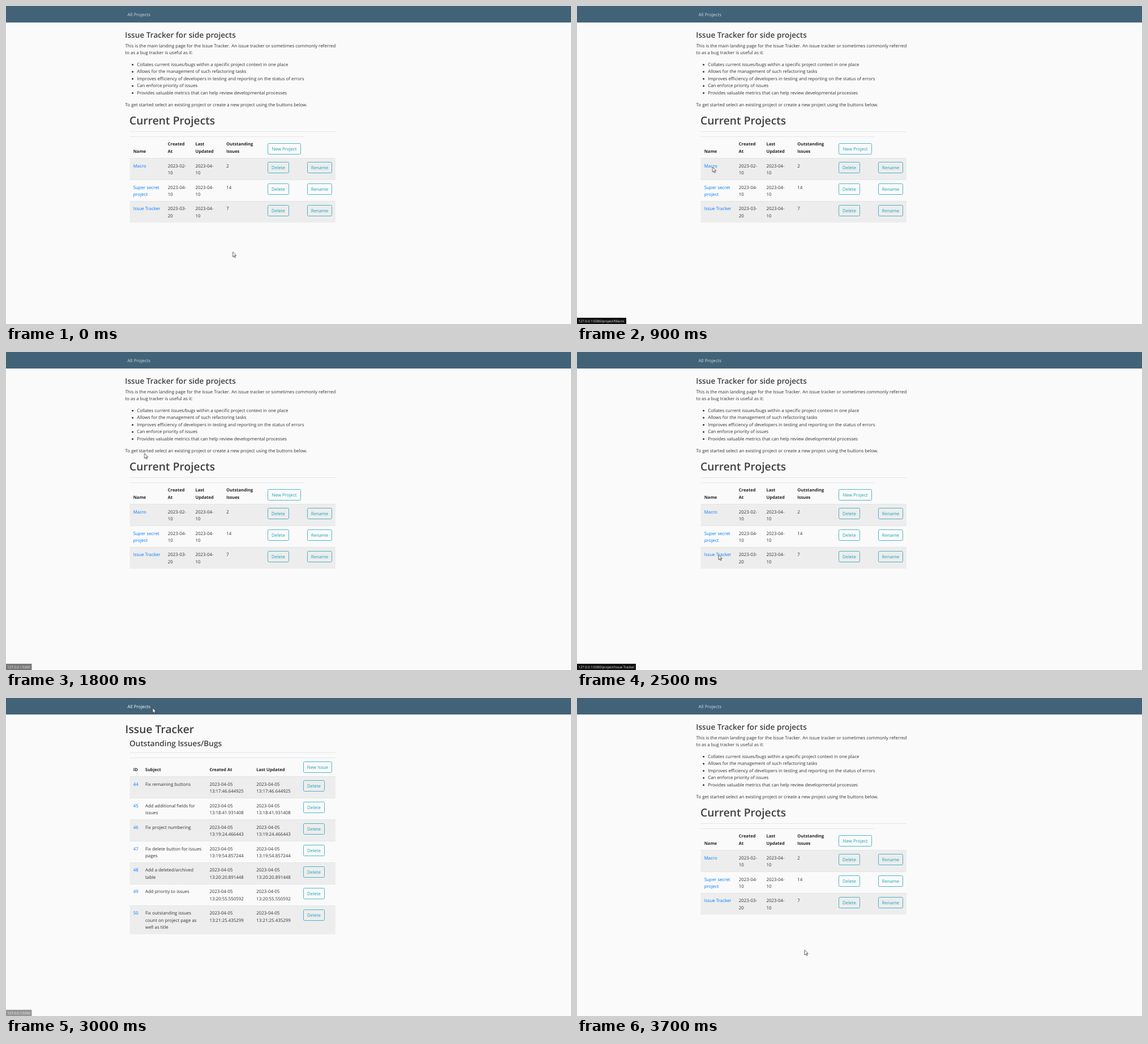
An HTML page for the animation above (4000 ms loop, 998 by 561 pixels).

```html
<!DOCTYPE html>
<html lang="en">
<head>
<meta charset="utf-8">
<title>Issue Tracker</title>
<style>
html, body { margin: 0; width: 100%; height: 100%; overflow: hidden; background: #fafafa; }
svg { display: block; width: 998px; height: 561px; }
text { font: 7.9px "Open Sans", "Noto Sans", sans-serif; fill: #333; text-rendering: geometricPrecision; white-space: pre; }
.h1 { font-size: 19.3px; font-weight: 600; fill: #404040; }
.h3 { font-size: 13.65px; font-weight: 600; fill: #404040; }
.th { font-size: 7.55px; font-weight: 700; fill: #212529; }
.link { fill: #007bff; }
.btn { fill: #17a2b8; text-anchor: middle; }
.nav { fill: #cbdfe4; }
.tip { font-size: 5.9px; fill: #e8eaed; }
.box { fill: none; stroke: #17a2b8; stroke-opacity: .75; }
.stripe { fill: #ededed; }
.rule { stroke: #e3e5e7; }
.under { stroke: #0056b3; stroke-width: .7; }

/* 100 ms is 2.5% of the loop */
.anim { animation: 4s step-end infinite; }
#main { animation-name: main; }
#macro { animation-name: macro; }
#tracker { animation-name: tracker; }
#overMacro { animation-name: overMacro; }
#overTracker { animation-name: overTracker; }
#navlink { animation-name: navlink; }
#tipMacro { animation-name: tipMacro; }
#tipHome { animation-name: tipHome; }
#tipTracker { animation-name: tipTracker; }
#cursor { animation-name: cursor; }

@keyframes main {
  0%, 42.5%, 80%, 100% { visibility: visible; }
  25%, 65% { visibility: hidden; }
}
@keyframes macro {
  0%, 42.5%, 100% { visibility: hidden; }
  25% { visibility: visible; }
}
@keyframes tracker {
  0%, 80%, 100% { visibility: hidden; }
  65% { visibility: visible; }
}
@keyframes overMacro {
  0%, 22.5%, 100% { opacity: 0; }
  12.5% { opacity: 1; }
}
@keyframes overTracker {
  0%, 62.5%, 100% { opacity: 0; }
  55% { opacity: 1; }
}
@keyframes navlink {
  0%, 42.5%, 80%, 100% { fill: #cbdfe4; }
  37.5%, 75% { fill: #fff; }
}
@keyframes tipMacro {
  0%, 30%, 100% { opacity: 0; }
  12.5%, 27.5% { opacity: .5; }
  15% { opacity: 1; }
}
@keyframes tipHome {
  0%, 47.5%, 85%, 100% { opacity: 0; }
  37.5%, 75% { opacity: .42; }
  40%, 77.5% { opacity: 1; }
  45%, 82.5% { opacity: .55; }
}
@keyframes tipTracker {
  0%, 70%, 100% { opacity: 0; }
  55%, 67.5% { opacity: .5; }
  57.5% { opacity: 1; }
}
@keyframes cursor {
  0% { transform: translate(400.5px, 433.8px); animation-timing-function: steps(5); }
  12.5% { transform: translate(242px, 288px); }
  15% { transform: translate(239.5px, 284.3px); }
  25% { transform: translate(239.5px, 284.3px); animation-timing-function: steps(4); }
  35% { transform: translate(250.5px, 58.5px); }
  37.5% { transform: translate(252px, 18px); }
  42.5% { transform: translate(250px, 95px); }
  45% { transform: translate(244.5px, 178.8px); animation-timing-function: steps(5); }
  57.5% { transform: translate(250px, 357.8px); }
  65% { transform: translate(250px, 357.8px); animation-timing-function: steps(4); }
  75% { transform: translate(259px, 17.5px); }
  80% { transform: translate(259px, 17.5px); animation-timing-function: steps(4); }
  90% { transform: translate(383px, 406.5px); }
  92.5%, 100% { transform: translate(402px, 444.5px); }
}
</style>
</head>
<body>
<svg id="stage" viewBox="0 0 998 561"></svg>
<script>
const LINE = 12.47, ROW = 37.9;

const text = (x, y, s, cls = "", id = "") =>
  `<text x="${x}" y="${y}" class="${cls}"${id && ` id="${id}"`}>${s}</text>`;
const lines = (x, y, s, cls) =>
  s.split("|").map((part, i) => text(x, y + i * LINE, part, cls)).join("");
const rule = (y, x2 = 582) => `<path class="rule" d="M218.5 ${y}H${x2}"/>`;
const button = (x, y, w, label) =>
  `<rect class="box" x="${x}" y="${y}" width="${w}" height="19" rx="2"/>` +
  text(x + w / 2, y + 12.6, label, "btn");
const stripe = (y, h) => `<rect class="stripe" x="218.5" y="${y}" width="363.5" height="${h}"/>`;
const under = (id, x1, x2, y) => `<path id="${id}" class="under anim" d="M${x1} ${y}H${x2}"/>`;
const page = (id, body) => `<g id="${id}" class="anim">${body}</g>`;
const tip = (id, w, s) =>
  `<g id="${id}" class="anim"><rect y="550" width="${w}" height="11" fill="#111"/>${text(2.6, 557.8, s, "tip")}</g>`;

function projectRow([name, created, updated, count], i) {
  const y = 268.5 + i * ROW, base = y + 16.1, top = Math.floor(y) + 7.5;
  return (i % 2 ? "" : stripe(y, ROW)) + rule(Math.floor(y) + .5) +
    lines(224.7, base, name, "link") + lines(285.8, base, created) +
    lines(334.5, base, updated) + text(389.2, base, count) +
    button(462.5, top, 37, "Delete") + button(532.5, top, 43, "Rename");
}

function home() {
  const bullets = [
    "Collates current issues/bugs within a specific project context in one place",
    "Allows for the management of such refactoring tasks",
    "Improves efficiency of developers in testing and reporting on the status of errors",
    "Can enforce priority of issues",
    "Provides valuable metrics that can help review developmental processes"
  ];
  const projects = [
    ["Macro", "2023-02-|10", "2023-04-|10", 2],
    ["Super secret|project", "2023-04-|10", "2023-04-|10", 14],
    ["Issue Tracker", "2023-03-|20", "2023-04-|10", 7]
  ];
  return text(210.3, 55.9, "Issue Tracker for side projects", "h3") +
    lines(210.5, 72.8, "This is the main landing page for the Issue Tracker. An issue tracker or sometimes commonly referred|to as a bug tracker is useful as it:") +
    bullets.map((s, i) =>
      `<circle cx="223.6" cy="${103.6 + i * LINE}" r="1.5" fill="#333"/>` +
      text(231.2, 106 + i * LINE, s)).join("") +
    text(210.5, 176.6, "To get started select an existing project or create a new project using the buttons below.") +
    text(218, 209, "Current Projects", "h1") +
    rule(221.5) + rule(230.5, 526) +
    text(224.7, 258.7, "Name", "th") +
    lines(285.8, 246.2, "Created|At", "th") +
    lines(334.5, 246.2, "Last|Updated", "th") +
    lines(389.2, 246.2, "Outstanding|Issues", "th") +
    button(462.5, 242.5, 58, "New Project") +
    projects.map(projectRow).join("") +
    under("overMacro", 224.7, 248, 285.8) + under("overTracker", 224.7, 271, 361.6);
}

function issues(title, createdX, updatedX, rows) {
  let y = 138.9, body = "";
  rows.forEach(([id, subject, created, updated = created], i) => {
    const h = ROW + (subject.split("|").length > 2 ? LINE : 0), base = y + 15.9;
    body += (i % 2 ? "" : stripe(y, h)) + rule(Math.floor(y) + .5) +
      text(224.7, base, id, "link") + lines(246, base, subject) +
      lines(createdX, base, created) + lines(updatedX, base, updated) +
      button(525.5, Math.floor(y) + 7.5, 37, "Delete");
    y += h;
  });
  return text(210.5, 62.3, title, "h1") +
    text(218, 85, "Outstanding Issues/Bugs", "h3") +
    rule(96.5) + rule(105.5) +
    text(224.7, 128.7, "ID", "th") + text(246, 128.7, "Subject", "th") +
    text(createdX, 128.7, "Created At", "th") + text(updatedX, 128.7, "Last Updated", "th") +
    button(525.5, 112.5, 50, "New Issue") + body;
}

const macroRows = [
  [69, "Add profiling", "2023-04-10|23:41:28.146503", "2023-04-10|23:41:52.794713"],
  [70, "Create gif|demo", "2023-04-10|23:41:55.883438", "2023-04-10|23:42:10.496217"]
];
const trackerRows = [
  ["Fix remaining buttons", "17:46.644925"],
  ["Add additional fields for|issues", "18:41.931408"],
  ["Fix project numbering", "19:24.466443"],
  ["Fix delete button for issues|pages", "19:54.857244"],
  ["Add a deleted/archived|table", "20:20.891448"],
  ["Add priority to issues", "20:55.550592"],
  ["Fix outstanding issues|count on project page as|well as title", "21:25.435299"]
].map(([subject, time], i) => [44 + i, subject, "2023-04-05|13:" + time]);

document.getElementById("stage").innerHTML =
  `<rect width="998" height="561" fill="#fafafa"/><rect width="998" height="29.1" fill="#426278"/>` +
  text(214.6, 17.6, "All Projects", "nav anim", "navlink") +
  page("main", home()) +
  page("macro", issues("Macro", 311.5, 418.3, macroRows)) +
  page("tracker", issues("Issue Tracker", 359.4, 442.3, trackerRows)) +
  tip("tipMacro", 87, "127.0.0.1:5000/project/Macro") +
  tip("tipHome", 45.5, "127.0.0.1:5000") +
  tip("tipTracker", 104, "127.0.0.1:5000/project/Issue Tracker") +
  `<g id="cursor" class="anim">
    <path d="M1 1V9.4L3 7.6 4.3 10.5 5.8 9.9 4.6 7.1H7Z" fill="#000" opacity=".22"/>
    <path d="M0 0V8.7L2 6.9 3.4 9.8 4.8 9.2 3.5 6.4H6.2Z" fill="#fff" stroke="#222" stroke-width=".7"/>
  </g>`;
</script>
</body>
</html>
```
